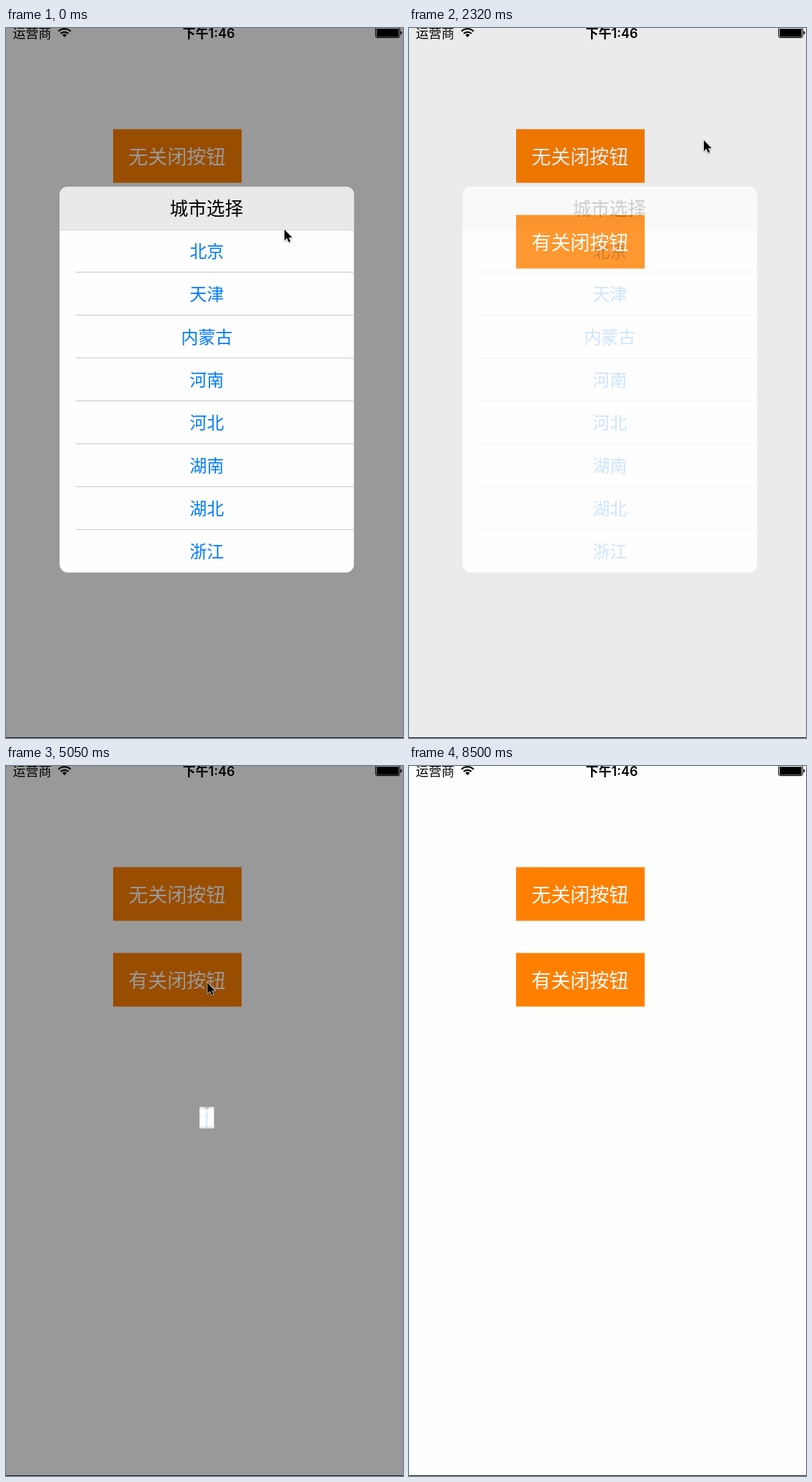
An HTML page for the animation above (8760 ms loop, 556 by 993 pixels).

```html
<!DOCTYPE html>
<html lang="zh-CN">
<head>
<meta charset="utf-8">
<style>
  html, body { margin: 0; width: 100%; height: 100%; overflow: hidden; background: #fefefe; }
  svg { display: block; }
  text { font-family: Inter, "Noto Sans CJK SC", "Noto Sans CJK", sans-serif; text-anchor: middle; }
</style>
</head>
<body>
<svg id="stage" width="556" height="993" viewBox="0 0 556 993"></svg>
<script>
const LOOP = 8760;
const CX = 281.25, CY = 491.75, W = 412.5, ROW = 60;
const CITIES = ['北京', '天津', '内蒙古', '河南', '河北', '湖南', '湖北', '浙江'];

// Screen refreshes: first, last, count. The picture holds between them.
const REFRESHES = [
  [110, 230, 2], [590, 710, 3], [1040, 1360, 6], [1530, 1960, 8], [2260, 2320, 2],
  [2460, 2460, 1], [2670, 2670, 1], [3380, 3440, 2], [4280, 4370, 2], [4600, 4750, 3],
  [4990, 5540, 10], [5900, 6740, 15], [6800, 6920, 3], [7150, 7380, 4], [7620, 8440, 15],
  [8500, 8500, 1]
];

// Popup visits: open time, close time, which popup
const VISITS = [[-999, 515, 0], [1507, 2190, 0], [3080, 4190, 1], [4967, 7090, 1]];

// Pointer: time, x, y
const POINTER = [
  [50, 390, 282], [230, 374, 315], [980, 374, 315], [1360, 269, 175], [1700, 269, 175],
  [1960, 413, 157], [2460, 413, 157], [2670, 407, 167], [3380, 282, 297], [3440, 316, 331],
  [4540, 316, 331], [4750, 281, 304], [5300, 284, 302], [5540, 488, 302], [5840, 488, 302],
  [5900, 496, 376], [6740, 284, 715], [6920, 275, 751], [7303, 275, 751], [7380, 283, 724],
  [7560, 283, 724], [8440, 506, 990]
];

const rect = (x, y, w, h, fill, extra = '') =>
  `<rect x="${x}" y="${y}" width="${w}" height="${h}" fill="${fill}" ${extra}/>`;
const label = (str, x, centre, size, fill, weight = 400) =>
  `<text x="${x}" y="${centre + size * 0.38}" font-size="${size}" fill="${fill}" font-weight="${weight}">${str}</text>`;
const button = (str, y) =>
  rect(150, y, 180, 75, '#ff8000') + label(str, 239.5, y + 38.5, 27.2, '#fff');

function popup(id, hasClose) {
  const h = ROW * (CITIES.length + 1 + hasClose);
  const x = CX - W / 2, y = CY - h / 2;
  const middle = row => y + ROW * row + 30.2;
  let body = rect(x, y, W, h, '#fefefe') + rect(x, y, W, ROW, '#e9e9e9')
    + rect(x, y + ROW + 0.25, W, 1, '#d0d0d2')
    + label('城市选择', CX - 0.5, middle(0), 25.8, '#000', 500);
  CITIES.forEach((city, i) => {
    body += label(city, CX, middle(i + 1), 24, '#007aff');
    if (i) body += rect(x + 22.5, y + ROW * (i + 1) - 0.75, W, 1, '#c9c9cc', i === 1 ? 'class="first"' : '');
  });
  if (hasClose) {
    body += rect(x, y + h - ROW, W, ROW, '#e9e9e9')
      + rect(x, y + h - ROW - 0.75, W, 1, '#c9c9cc')
      + label('关闭', CX - 0.5, middle(9), 25, '#007aff');
  }
  return `<clipPath id="clip${id}">${rect(x, y, W, h, '#000', 'rx="12"')}</clipPath>
    <g id="popup${id}">${rect(0, 0, 556, 993, '#000', 'opacity=".4"')}
    <g class="panel"><g clip-path="url(#clip${id})">${body}</g></g></g>`;
}

const wifi = `<g fill="none" stroke="#000" stroke-width="2.3">
  <path d="M73.5 4.6A12 12 0 0 1 90.5 4.6M76.6 7.8A7.6 7.6 0 0 1 87.4 7.8"/>
  <path d="M79 9.8A4.3 4.3 0 0 1 85 9.8L82 13Z" fill="#000" stroke="none"/></g>`;
const battery = rect(517.5, -0.5, 34, 14, 'none', 'rx="2.5" stroke="#000"')
  + rect(519, 1, 31, 11.5, '#000', 'rx="1.2"')
  + '<path d="M552.6 4.2Q554.6 4.5 554.6 6.7T552.6 9.2Z"/>';

const stage = document.getElementById('stage');
stage.innerHTML = rect(0, 0, 556, 993, '#fefefe')
  + button('无关闭按钮', 141.5) + button('有关闭按钮', 261.5)
  + popup(0, 0) + popup(1, 1)
  + label('运营商', 36.5, 7.2, 18, '#000') + wifi
  + label('下午1:46', 284, 7.2, 18, '#000', 600) + battery
  + rect(0, 992, 556, 1, '#101c28')
  + `<path id="pointer" d="M0 0V15L3.5 11.8L6 17.5L8.3 16.5L6 11H10.7Z"
      stroke="#fff" stroke-width="1.2" paint-order="stroke"
      style="filter:drop-shadow(0 1px 1px rgba(0,0,0,.35))"/>`;

const popups = [0, 1].map(id => document.getElementById('popup' + id));
const pointer = document.getElementById('pointer');

const ease = p => { p = Math.min(1, Math.max(0, p)); return p * p * (3 - 2 * p); };

function heldTime(t) {
  let held = 0;
  for (const [first, last, count] of REFRESHES) {
    for (let i = 0; i < count; i++) {
      const at = first + (last - first) * i / Math.max(1, count - 1);
      if (at <= t) held = at;
    }
  }
  return held;
}

// Bounce: 0.01 -> 1.1 -> 0.9 -> 1
const bounce = age =>
  0.01 + 1.09 * ease(age / 200) - 0.2 * ease((age - 200) / 100) + 0.1 * ease((age - 300) / 60);

function pointerAt(t) {
  let from = POINTER[0];
  for (const to of POINTER) {
    if (t < to[0]) {
      const p = ease((t - from[0]) / (to[0] - from[0] || 1));
      return [1, 2].map(k => from[k] + (to[k] - from[k]) * p);
    }
    from = to;
  }
  return from.slice(1);
}

function draw(now) {
  const t = heldTime(now % LOOP);
  popups.forEach(p => p.style.display = 'none');
  for (const [open, close, id] of VISITS) {
    const alpha = 1 - ease((t - close) / 180);
    if (t < open || alpha <= 0) continue;
    const group = popups[id], scale = bounce(t - open);
    group.style.display = '';
    group.style.opacity = alpha;
    group.querySelector('.panel').setAttribute('transform',
      `translate(${CX} ${CY}) scale(${scale}) translate(${-CX} ${-CY})`);
    group.querySelector('.first').style.display = scale < 0.95 ? 'none' : '';
  }
  pointer.style.display = t < 8500 ? '' : 'none';
  pointer.setAttribute('transform', `translate(${pointerAt(t)})`);
}

const start = performance.now();
function tick() {
  draw(performance.now() - start);
  requestAnimationFrame(tick);
}
tick();
</script>
</body>
</html>
```
